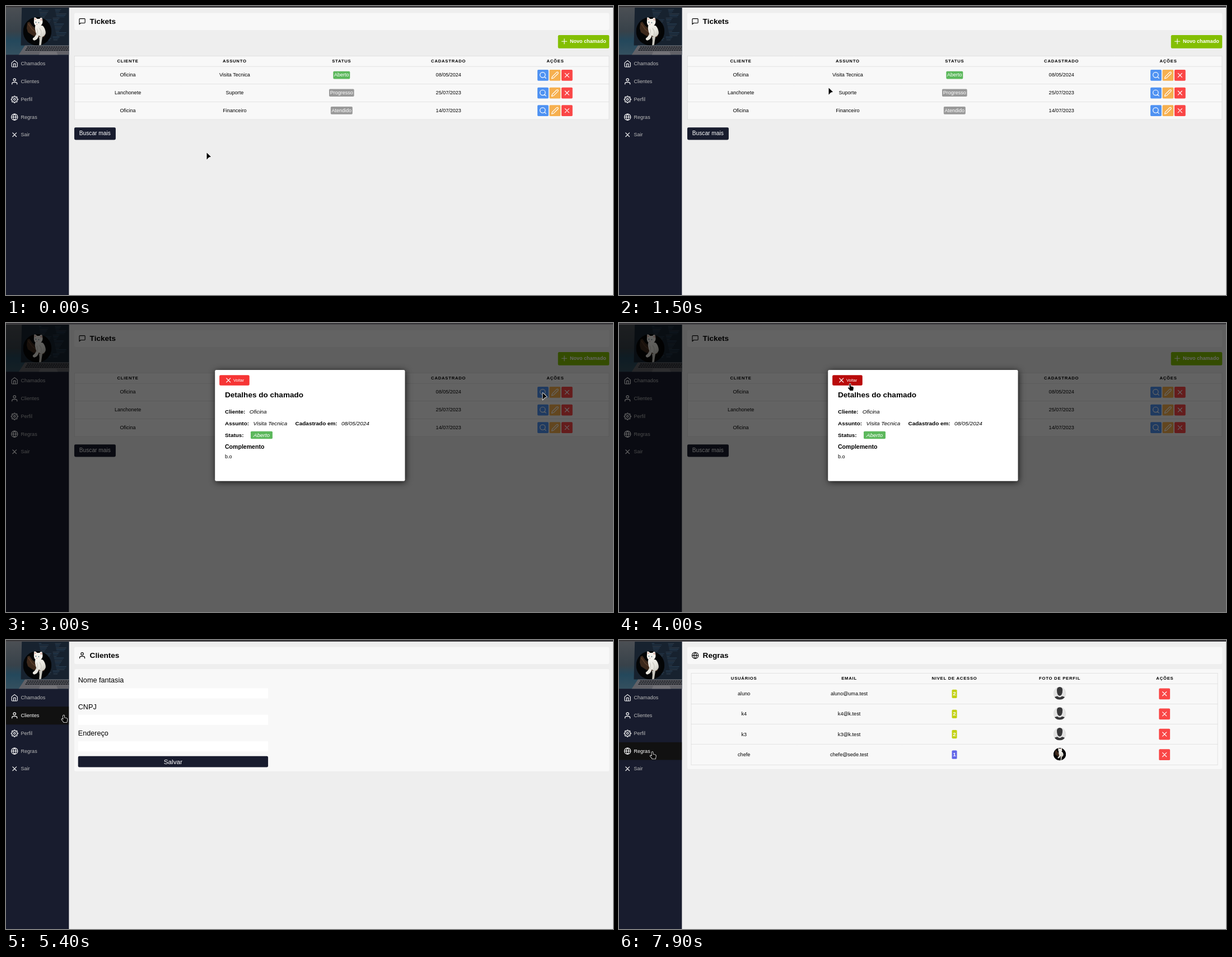
Animation of 1084 by 517 pixels, one loop 8 s. Source, as an HTML page:

```html
<!DOCTYPE html>
<html lang="pt-BR">
<head>
<meta charset="utf-8">
<title>Tickets</title>
<style>
html, body { margin: 0; width: 100%; height: 100%; overflow: hidden; background: #eee; }
* { box-sizing: border-box; }
/* laid out at 1920 px wide, shown at 1084 */
#stage { position: absolute; width: 1920px; height: 916px; transform: scale(.564583); transform-origin: 0 0;
  font: 16px "Liberation Sans", Arial, sans-serif; color: #000; background: #eee; overflow: hidden; }
.icon { fill: none; stroke: currentColor; stroke-width: 2; stroke-linecap: round; stroke-linejoin: round; flex: none; }
#chrome { position: absolute; width: 100%; height: 5px; background: #363538; }
#side { position: absolute; top: 5px; width: 199px; height: 911px; background: #181c2e; overflow: hidden; }
#side > svg { display: block; }
.item { display: flex; align-items: center; gap: 8px; height: 56.3px; padding-left: 15px; color: #bbb; }
.item .icon { color: #fff; }
.item.hover { background: #111; color: #fff; }
.page { display: none; }
.abs, .text, .box { position: absolute; }
.text { white-space: nowrap; transform: translateY(-50%); }
.card { position: absolute; left: 215.5px; width: 1692px; background: #f8f8f8; border-radius: 5px; }
.btn { position: absolute; display: flex; align-items: center; justify-content: center; border-radius: 4px; color: #fff; background: #181c2e; }
table { position: absolute; border-collapse: collapse; table-layout: fixed; background: #f8f8f8; text-align: center; }
table, tr { border: 1px solid #d3d3d3; }
th, td { padding: 0; }
th { font-size: 13.6px; letter-spacing: .1em; text-transform: uppercase; height: 33px; }
.badge { display: inline-block; padding: 3px; border-radius: 3px; color: #fff; line-height: 18px; }
.level { font-weight: bold; font-size: 17.6px; line-height: 21px; }
.acts { display: flex; justify-content: center; gap: 3px; padding-right: 3px; }
.act { width: 35px; height: 35px; border-radius: 3px; display: flex; align-items: center; justify-content: center; color: #fff; }
td svg.face { display: block; margin: -2px auto 0; border-radius: 50%; }
#shade { position: absolute; top: 5px; width: 100%; height: 911px; background: rgba(0,0,0,.6); }
#dialog { position: absolute; left: 660.5px; top: 144px; width: 601px; height: 351.5px; background: #fff; border-radius: 4px;
  box-shadow: 2px 3px 20px rgba(0,0,0,.8); }
#back { background: #f63535; }
#back.hover { background: #b90b0b; }
#cursor { position: absolute; left: 0; top: 0; overflow: visible; }
#cursor path { fill: #000; stroke: #fff; stroke-width: 1.6; stroke-linejoin: round; paint-order: stroke; }
</style>
</head>
<body>
<svg width="0" height="0" style="position:absolute">
  <clipPath id="disc"><circle cx="71" cy="71" r="71"/></clipPath>
  <filter id="soft"><feGaussianBlur stdDeviation="1.1"/></filter>
  <linearGradient id="fur" x2="1" y2="1"><stop stop-color="#f6f4ef"/><stop offset=".55" stop-color="#e9e7e0"/><stop offset="1" stop-color="#b3b1a8"/></linearGradient>
  <symbol id="cat" viewBox="0 0 142 142">
    <g clip-path="url(#disc)">
      <path d="M0 0H142V142H0Z" fill="#040506"/>
      <g filter="url(#soft)">
        <path d="M18 56L22 27L32 24L46 44L64 58L80 84L110 92L104 101L76 100L48 92L24 76Z" fill="#3c281b"/>
        <path d="M26 34L46 62L84 92" stroke="#5d402d" stroke-width="4" fill="none"/>
        <path d="M60 44Q82 38 99 44Q112 58 113 80Q110 96 92 100L78 92Q75 112 56 117Q46 114 49 106Q62 97 66 84Q58 62 60 44Z" fill="url(#fur)"/>
        <path d="M80 98L97 97Q93 118 90 142H80Q84 118 80 98Z" fill="#c9c7bf"/>
        <path d="M54 28L55 1Q64 1 70 9H82Q86 2 95 3L98 24Q97 44 75 49Q57 45 54 28Z" fill="#f4f2ec"/>
        <path d="M57 16L58 4L66 12ZM85 13L94 6L94 20Z" fill="#dcaaa0"/>
        <path d="M82 56Q96 72 88 92M68 58Q76 76 68 92" stroke="#c6c4bb" stroke-width="3" fill="none"/>
      </g>
      <circle cx="64" cy="26" r="3" fill="#66808d"/><circle cx="78" cy="28" r="3" fill="#66808d"/>
      <path d="M66 35H72L69 39Z" fill="#cc8d87"/>
    </g>
  </symbol>
  <symbol id="nobody" viewBox="0 0 40 40">
    <path d="M0 0H40V40H0Z" fill="#e2e2e2"/>
    <path d="M11 9Q12 0 20 0T29 9Q29 27 20 28Q11 27 11 9ZM3 32Q9 29 13 29Q20 36 27 29Q33 30 37 33L30 40H10Z" fill="#38383a"/>
  </symbol>
</svg>
<div id="stage"></div>
<svg id="cursor" width="14" height="16"><path/></svg>

<script>
const gear = Array.from({ length: 96 }, (_, i) => {
  const a = i / 96 * 2 * Math.PI;
  const r = 9.3 + Math.max(-1, Math.min(1, 2 * Math.cos(8 * a))) * 1.5;
  return `${(12 + r * Math.cos(a)).toFixed(1)} ${(12 + r * Math.sin(a)).toFixed(1)}`;
}).join('L');
const shapes = {
  home: 'M3 9l9-7 9 7v11a2 2 0 0 1-2 2H5a2 2 0 0 1-2-2zM9 22V12h6v10',
  user: 'M20 21v-2a4 4 0 0 0-4-4H8a4 4 0 0 0-4 4v2M8 7a4 4 0 1 0 8 0a4 4 0 1 0-8 0',
  gear: `M${gear}ZM9 12a3 3 0 1 0 6 0a3 3 0 1 0-6 0`,
  globe: 'M2 12a10 10 0 1 0 20 0a10 10 0 1 0-20 0H22M12 2a15.3 15.3 0 0 1 4 10 15.3 15.3 0 0 1-4 10 15.3 15.3 0 0 1-4-10 15.3 15.3 0 0 1 4-10z',
  cross: 'M18 6L6 18M6 6l12 12',
  chat: 'M21 15a2 2 0 0 1-2 2H7l-4 4V5a2 2 0 0 1 2-2h14a2 2 0 0 1 2 2z',
  plus: 'M12 4v16M4 12h16',
  search: 'M3 11a8 8 0 1 0 16 0a8 8 0 1 0-16 0M21 21l-4.3-4.3',
  pencil: 'M17 3a2.8 2.8 0 1 1 4 4L7.5 20.5 2 22l1.5-5.5z',
  upload: 'M21 15v4a2 2 0 0 1-2 2H5a2 2 0 0 1-2-2v-4M17 8l-5-5-5 5M12 3v12',
};
const icon = (name, size = 24) =>
  `<svg class="icon" width="${size}" height="${size}" viewBox="0 0 24 24"><path d="${shapes[name]}"/></svg>`;
const text = (x, y, size, str, css = '') =>
  `<div class="text" style="left:${x}px;top:${y}px;font-size:${size}px;${css}">${str}</div>`;
const place = (x, y, w, h) => `left:${x}px;top:${y}px;width:${w}px;height:${h}px;`;
const box = (x, y, w, h, css) => `<div class="box" style="${place(x, y, w, h)}${css}"></div>`;
const card = (y, h) => `<div class="card" style="top:${y}px;height:${h}px"></div>`;
const button = (x, y, w, h, size, str) => `<div class="btn" style="${place(x, y, w, h)}font-size:${size}px">${str}</div>`;
const title = (name, str) => card(21.5, 54) +
  `<div class="abs" style="left:228.5px;top:36.5px">${icon(name)}</div>` + text(265, 49, 24, str, 'font-weight:bold');
const badge = (color, str, cls = '') => `<span class="badge ${cls}" style="background:${color}">${str}</span>`;
const act = (color, name, id = '') => `<span class="act" ${id && `id="${id}"`} style="background:${color}">${icon(name, 25)}</span>`;
const acts = (...list) => `<div class="acts">${list.join('')}</div>`;
const table = (x, y, w, rowHeight, heads, rows) =>
  `<table style="left:${x}px;top:${y}px;width:${w}px"><tr>${heads.map(h => `<th>${h}</th>`).join('')}</tr>` +
  rows.map(r => `<tr style="height:${rowHeight}px">${r.map(c => `<td>${c}</td>`).join('')}</tr>`).join('') + '</table>';
const field = (y, label, value = '', css = 'background:#fff') =>
  text(228, y, 22.4, label) + box(228, y + 25, 601, 32, css) + text(237.5, y + 41, 13.33, value, css);
const page = (id, html) => `<div class="page" id="${id}">${html}</div>`;

const red = '#fa4646', green = '#5cb85c', grey = '#999';
const ticket = (client, subject, color, status, date, id) => [client, subject, badge(color, status), date,
  acts(act('#4f92f2', 'search', id), act('#f6b04f', 'pencil'), act(red, 'cross'))];
const face = id => `<svg class="face" width="40" height="40"><use href="#${id}"/></svg>`;
const member = (name, mail, color, level, pic) =>
  [name, mail, badge(color, level, 'level'), face(pic), acts(act(red, 'cross'))];

const codeLines = Array.from({ length: 44 }, (_, i) => {
  const x = (i % 2 ? 148 : 104) + (i * 7) % 13, y = 6 + (i >> 1) * 4.6;
  return `<path d="M${x} ${y}h${8 + (i * 11) % 26}" stroke="${['#3d6280', '#4b5d6b', '#2f4d68'][i % 3]}"/>`;
}).join('');
const keys = [125, 130, 135].map((y, i) =>
  `<path d="M${67 - i * 3} ${y}H200" stroke="#23262c" stroke-width="3.8" stroke-dasharray="6 1.5"/>`).join('');
const banner = `<svg width="200" height="150" viewBox="0 0 200 150">
  <defs><linearGradient id="wall" x2="0" y2="1"><stop stop-color="#4b4f54"/><stop offset=".5" stop-color="#38424a"/>
  <stop offset=".7" stop-color="#24485c"/><stop offset="1" stop-color="#35505f"/></linearGradient></defs>
  <path d="M0 0H200V150H0Z" fill="url(#wall)"/>
  <path d="M50 0H200V120H47Z" fill="#17222f"/>${codeLines}
  <path d="M60 120H200V150H40Z" fill="#626268"/>${keys}
  <path d="M108 140H160L164 150H104Z" fill="#747378"/>
  <use href="#cat" x="54" y="30" width="90" height="90"/></svg>`;
const menu = [['home', 'Chamados'], ['user', 'Clientes'], ['gear', 'Perfil'], ['globe', 'Regras'], ['cross', 'Sair']];
const bold = 'font-weight:bold', italic = 'font-style:italic';

stage.innerHTML =
  page('tickets', title('chat', 'Tickets') +
    `<div class="btn" style="${place(1745.5, 92, 162, 41.5)}background:#83bf02"></div>` +
    `<div class="abs" style="left:1754px;top:100px;color:#fff">${icon('plus')}</div>` +
    text(1783.5, 112, 16, 'Novo chamado', bold + ';color:#fff') +
    table(215.5, 157.5, 1692, 56, ['Cliente', 'Assunto', 'Status', 'Cadastrado', 'Ações'], [
      ticket('Oficina', 'Visita Tecnica', green, 'Aberto', '08/05/2024', 'view'),
      ticket('Lanchonete', 'Suporte', grey, 'Progresso', '25/07/2023'),
      ticket('Oficina', 'Financeiro', grey, 'Atendido', '14/07/2023')]) +
    button(215.5, 385, 131.5, 39, 18, 'Buscar mais')) +
  page('clients', title('user', 'Clientes') + card(92, 324) +
    field(128, 'Nome fantasia') + field(212, 'CNPJ') + field(296, 'Endereço') +
    button(228, 368, 601, 35, 20.8, 'Salvar')) +
  page('profile', title('gear', 'Minha Conta') + card(92, 545.5) +
    `<svg class="abs" style="left:243px;top:145.5px" width="250" height="250"><use href="#cat"/></svg>` +
    `<div class="abs" style="left:355.5px;top:253px;color:#fff;opacity:.6">${icon('upload', 25)}</div>` +
    field(433.5, 'Nome', 'chefe') +
    field(517.5, 'Email', 'chefe@sede.test', 'background:#f3f5f7;color:#555') +
    button(228, 589.5, 601, 35, 20.8, 'Salvar')) +
  page('loading', title('globe', 'Regras') + card(92, 46) + text(964, 115, 18, 'Carregando...')) +
  page('rules', title('globe', 'Regras') + card(92, 317) +
    table(228, 104.5, 1666, 64.3, ['Usuários', 'Email', 'Nivel de acesso', 'Foto de perfil', 'Ações'], [
      member('aluno', 'aluno@uma.test', '#c2d116', 2, 'nobody'),
      member('k4', 'k4@k.test', '#c2d116', 2, 'nobody'),
      member('k3', 'k3@k.test', '#c2d116', 2, 'nobody'),
      member('chefe', 'chefe@sede.test', '#6366e8', 1, 'cat')])) +
  `<div id="side">${banner}${menu.map(([i, s]) => `<div class="item">${icon(i)}<span>${s}</span></div>`).join('')}</div>` +
  '<div id="chrome"></div>' +
  `<div id="shade"><div id="dialog"></div><div class="btn" id="back" style="${place(675, 159.5, 94.5, 33.5)}"></div>` +
    `<div class="abs" style="left:690.5px;top:163.5px;color:#fff">${icon('cross', 25)}</div>` +
    text(719, 176.5, 13.33, 'Voltar', 'color:#fff') +
    text(692.5, 222, 24, 'Detalhes do chamado', bold) +
    text(692.5, 275.5, 17.6, 'Cliente:', bold) + text(770, 275.5, 17.6, 'Oficina', italic) +
    text(692.5, 313, 17.6, 'Assunto:', bold) + text(782, 313, 17.6, 'Visita Tecnica', italic) +
    text(915, 313, 17.6, 'Cadastrado em:', bold) + text(1061, 313, 17.6, '08/05/2024', italic) +
    text(692.5, 350, 17.6, 'Status:', bold) + box(774, 338, 69, 24, `background:${green};border-radius:3px`) +
    text(782.5, 350, 17.6, 'Aberto', italic + ';color:#fff') +
    text(692.5, 388, 18.72, 'Complemento', bold) + text(692.5, 419, 16, 'b.o') + '</div>';

const arrow = 'M.5 1L8 8.3L4.2 9.2L.5 13.3Z';
const hand = 'M3 1.4Q4 -.4 5 1.2L5.3 5.2L9 6Q10.6 6.4 10.3 8.5L9.5 13H4L3.2 11.5L.5 8.4Q.2 7 1.6 7.2L3.3 8.4Z';

// [time, x, y, pointing hand]
const moves = [
  [0, 358, 261.5], [200, 350, 255], [300, 318, 232], [400, 265, 200], [500, 200, 165], [600, 142, 132],
  [700, 95, 110, 1], [800, 70, 102, 1],
  [1200, 92, 104, 1], [1300, 152, 112], [1400, 255, 127], [1500, 374, 145.5], [1600, 500, 157], [1700, 625, 167],
  [1800, 745, 174], [1900, 850, 180], [2000, 924, 181],
  [2100, 922, 202], [2200, 902, 217], [2300, 879, 211], [2400, 887, 185], [2500, 920, 152], [2600, 950, 129],
  [2800, 957, 124.5, 1], [3000, 958, 124],
  [3300, 938, 136], [3400, 880, 155], [3500, 780, 172], [3600, 670, 177], [3700, 570, 168], [3800, 490, 146],
  [3900, 436, 121], [4000, 408.5, 108, 1],
  [4300, 412, 107], [4500, 395, 109], [4700, 240, 132], [4800, 101, 153],
  [5200, 99, 134, 1], [5600, 99, 135, 1], [6300, 59, 174, 1], [7500, 55.5, 199.5, 1],
];
const screens = [[0, 'tickets'], [5400, 'clients'], [6600, 'profile'], [7500, 'loading'], [7900, 'rules']];
const at = (track, t) => track.findLast(step => step[0] <= t);
const $$ = q => [...document.querySelectorAll(q)];
const pages = $$('.page'), items = $$('.item'), pointer = document.querySelector('#cursor path');
const byId = id => document.getElementById(id);
const start = performance.now();

function draw() {
  const t = (performance.now() - start) % 8000;
  const [, x, y, pointing] = at(moves, t);
  const screen = at(screens, t)[1];
  const open = t >= 3000 && t < 4300;
  const hovered = pointing && x < 112 ? Math.floor((y - 87.8) / 31.7) : -1;
  pages.forEach(p => p.style.display = p.id === screen ? 'block' : 'none');
  items.forEach((item, i) => item.classList.toggle('hover', i === hovered));
  byId('shade').style.display = open ? 'block' : 'none';
  byId('back').classList.toggle('hover', open && !!pointing);
  byId('view').style.background = t >= 2800 && t < 3000 ? '#4b7ee8' : '#4f92f2';
  byId('cursor').style.transform = `translate(${x}px,${y}px)`;
  pointer.setAttribute('d', pointing ? hand : arrow);
  requestAnimationFrame(draw);
}
draw();
</script>
</body>
</html>
```
